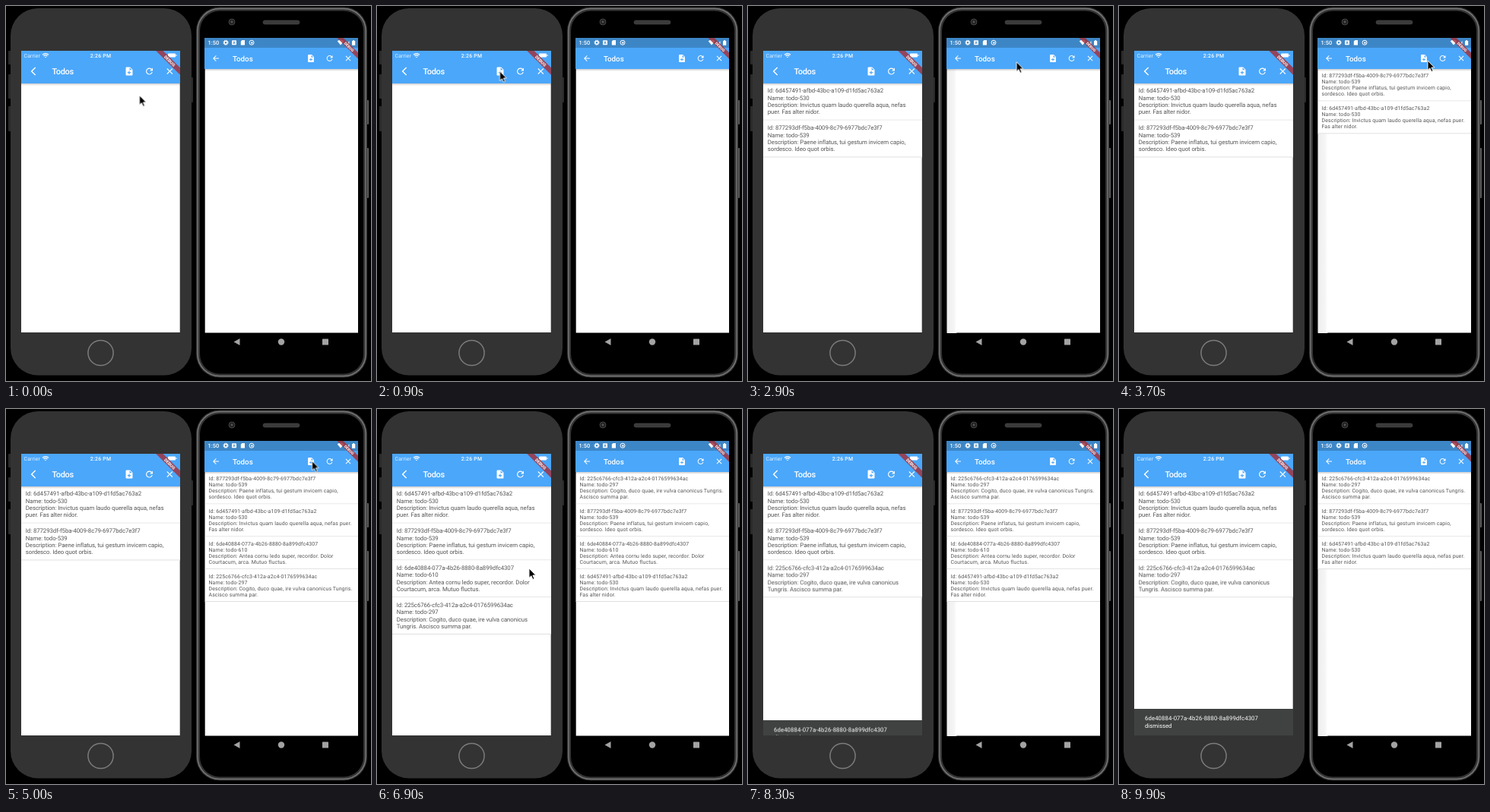
These frames come from a looping animation (480 px wide and 494 px high, 10000 ms). An HTML page:

```html
<!DOCTYPE html>
<html lang="en">
<head>
<meta charset="utf-8">
<title>Todos on two phones</title>
<style>
html, body { margin: 0; width: 100%; height: 100%; overflow: hidden; background: #000; }
svg { display: block; width: 480px; height: 494px; }
text { font-family: Roboto, "Liberation Sans", sans-serif; text-rendering: geometricPrecision; white-space: pre; }
.row text { fill: #555; }
.ios .row text { font-size: 7.8px; letter-spacing: -.06px; }
.droid .row text { font-size: 6.95px; letter-spacing: .11px; }
.title { fill: #fff; font-weight: 500; }
.icon { fill: #fff; }

.anim { animation: 10s linear infinite; }
.cut { animation-timing-function: step-end; opacity: 0; }

.ios1 { animation-name: ios1 }
.ios2 { animation-name: ios2 }
.ios3 { animation-name: ios3 }
.ios4 { animation-name: ios4 }
.under { animation-name: under }
.pair { animation-name: pair }
.third { animation-name: third }
.fourth { animation-name: fourth }
.sorted { animation-name: sorted }
.final { animation-name: final }
.edge { animation-name: edge }
@keyframes ios1 { 0% { opacity: 0 } 9.9%, 100% { opacity: 1 } }
@keyframes ios2 { 0% { opacity: 0 } 24.9%, 100% { opacity: 1 } }
@keyframes ios3 { 0% { opacity: 0 } 61.9% { opacity: 1 } 82%, 100% { opacity: 0 } }
@keyframes ios4 { 0% { opacity: 0 } 61.9%, 100% { opacity: 1 } }
@keyframes under { 0% { opacity: 0 } 70.5% { opacity: 1 } 82%, 100% { opacity: 0 } }
@keyframes pair { 0% { opacity: 0 } 32.9% { opacity: 1 } 54.9%, 100% { opacity: 0 } }
@keyframes third { 0% { opacity: 0 } 40.9% { opacity: 1 } 54.9%, 100% { opacity: 0 } }
@keyframes fourth { 0% { opacity: 0 } 45.9% { opacity: 1 } 54.9%, 100% { opacity: 0 } }
@keyframes sorted { 0% { opacity: 0 } 54.9% { opacity: 1 } 87.9%, 100% { opacity: 0 } }
@keyframes final { 0% { opacity: 0 } 87.9%, 100% { opacity: 1 } }
@keyframes edge { 0% { opacity: 0 } 10.9% { opacity: 1 } 43.9% { opacity: 0 } 76.9%, 100% { opacity: 1 } }

.swipe { animation-name: swipe }
.shrink { animation-name: shrink; transform-origin: 0 199.4px }
.lift { animation-name: lift }
.snack { animation-name: snack }
.cursor { animation-name: cursor; animation-timing-function: ease-in-out }
@keyframes swipe {
  0%, 70.5% { transform: translateX(0); animation-timing-function: ease-in-out }
  77% { transform: translateX(-194px) }
  78%, 100% { transform: translateX(-210px) }
}
@keyframes shrink {
  0%, 79% { transform: scaleY(1); animation-timing-function: ease }
  82%, 100% { transform: scaleY(0) }
}
@keyframes lift {
  0%, 79% { transform: translateY(0); animation-timing-function: ease }
  82%, 100% { transform: translateY(-48.8px) }
}
@keyframes snack {
  0%, 82% { transform: translateY(36px); animation-timing-function: ease-out }
  84.5%, 100% { transform: translateY(0) }
}
@keyframes cursor {
  0%, 1% { transform: translate(175.5px, 117.8px) }
  8%, 25.5% { transform: translate(161.5px, 86px) }
  31%, 33.5% { transform: translate(425px, 69px) }
  37% { transform: translate(406px, 72px) }
  39.5%, 51% { transform: translate(402.5px, 68.5px) }
  53.5%, 55.5% { transform: translate(425px, 69px) }
  60%, 62.5% { transform: translate(188px, 85px) }
  68%, 70% { transform: translate(200px, 210px) }
  77% { transform: translate(-4px, 222px) }
  78%, 100% { transform: translate(-20px, 222px) }
}
</style>
</head>
<body>
<svg viewBox="0 0 480 494">
  <defs>
    <clipPath id="iosScreen"><rect x="20" y="59" width="208.7" height="371"/></clipPath>
    <clipPath id="droidScreen"><rect x="261.7" y="42" width="201.3" height="388.5"/></clipPath>
    <linearGradient id="shade" x2="0" y2="1"><stop stop-color="#000" stop-opacity=".2"/><stop offset="1" stop-color="#000" stop-opacity="0"/></linearGradient>
    <linearGradient id="side"><stop stop-color="#efefef"/><stop offset=".75" stop-color="#f5f5f5"/><stop offset="1" stop-color="#fff"/></linearGradient>
    <path id="back" d="M20 11H7.83l5.59-5.59L12 4l-8 8 8 8 1.41-1.41L7.83 13H20z"/>
    <path id="chevron" d="M17.67 3.87 15.9 2.1 6 12l9.9 9.9 1.77-1.77L9.54 12z"/>
    <path id="add" d="M14 2H6c-1.1 0-2 .9-2 2v16c0 1.1.9 2 2 2h12c1.1 0 2-.9 2-2V8zm2 14h-3v3h-2v-3H8v-2h3v-3h2v3h3zm-3-7V3.5L18.5 9z"/>
    <path id="refresh" d="M17.65 6.35A8 8 0 1 0 19.73 14h-2.08A6 6 0 1 1 16.22 7.78L13 11h7V4z"/>
    <path id="close" d="M19 6.41 17.59 5 12 10.59 6.41 5 5 6.41 10.59 12 5 17.59 6.41 19 12 13.41 17.59 19 19 17.59 13.41 12z"/>
    <g id="banner">
      <rect x="-44" y="28" width="88" height="12" fill="#a4303a" fill-opacity=".82"/>
      <text y="37.7" font-size="10.2" font-weight="900" fill="#fff" fill-opacity=".9" text-anchor="middle">DEBUG</text>
    </g>
  </defs>

  <!-- Left phone -->
  <g fill="#2b2b2b">
    <rect x="3" y="59" width="5" height="18" rx="1"/>
    <rect x="3" y="90" width="5" height="32" rx="1"/>
    <rect x="3" y="132" width="5" height="33" rx="1"/>
    <rect x="242" y="94" width="4" height="33" rx="1"/>
  </g>
  <rect x="6" y="3" width="238" height="483.5" rx="36" fill="#333"/>
  <circle cx="124.5" cy="457" r="16.6" fill="none" stroke="#7b7b7b" stroke-width="1.5"/>
  <g class="ios" clip-path="url(#iosScreen)">
    <rect x="20" y="59" width="209" height="371" fill="#fff"/>
    <g id="iosList"></g>
    <rect x="20" y="102" width="209" height="3" fill="url(#shade)"/>
    <rect x="20" y="59" width="209" height="43" fill="#4ba7fa"/>
    <g fill="#fff" font-size="6.9">
      <text x="23.6" y="67.6" fill-opacity=".85" letter-spacing=".1">Carrier</text>
      <text x="124.5" y="67.6" font-weight="500" text-anchor="middle" letter-spacing=".25">2:26 PM</text>
      <rect x="213" y="62.5" width="10" height="5" rx="1"/>
      <rect x="223.5" y="64" width="1" height="2"/>
    </g>
    <g fill="none" stroke="#fff" stroke-width="1.2">
      <path d="M48 64.3Q52 60.8 56 64.3M49.6 66Q52 63.8 54.4 66M51.2 67.5h1.6"/>
    </g>
    <text class="title" x="60.5" y="90" font-size="11" letter-spacing="-.35">Todos</text>
    <g class="icon" id="iosIcons"></g>
    <use href="#banner" transform="translate(228.7 59) rotate(45) scale(.557)"/>
    <g class="anim snack">
      <rect x="20" y="395" width="209" height="36" fill="#404242"/>
      <g fill="#fff" font-size="7.75">
        <text x="34" y="410.3" letter-spacing=".1">6de40884-077a-4b26-8880-8a899dfc4307</text>
        <text x="34" y="419.6">dismissed</text>
      </g>
    </g>
  </g>

  <!-- Right phone -->
  <g fill="#5a5a5a">
    <rect x="473" y="124" width="4" height="32" rx="1"/>
    <rect x="473" y="187" width="4" height="66" rx="1"/>
  </g>
  <rect x="250" y="1.5" width="225" height="488" rx="31" fill="#353535"/>
  <rect x="252" y="3.5" width="221" height="484" rx="29" fill="none" stroke="#7a7a7a" stroke-width="1.4"/>
  <rect x="255" y="6.5" width="215" height="478" rx="26" fill="#000"/>
  <circle cx="297" cy="21" r="4" fill="#222" stroke="#444"/>
  <circle cx="297" cy="21" r="1.4" fill="#555"/>
  <rect x="338" y="19" width="48" height="5" rx="2.5" fill="#3a3a3a" stroke="#4c4c4c" stroke-width=".6"/>
  <g fill="#a3a3a3">
    <path d="M299.5 442.5 307.5 438v9z"/>
    <circle cx="362" cy="442.5" r="4.2"/>
    <rect x="416" y="438.5" width="8" height="8" rx=".6"/>
  </g>
  <g class="droid" clip-path="url(#droidScreen)">
    <rect x="261" y="42" width="203" height="389" fill="#fff"/>
    <rect class="anim cut edge" x="261.7" y="83" width="12.5" height="348" fill="url(#side)"/>
    <g id="droidList"></g>
    <rect x="261" y="83" width="203" height="3" fill="url(#shade)"/>
    <rect x="261" y="42" width="203" height="41" fill="#4ba7fa"/>
    <rect x="261" y="42" width="203" height="13" fill="#3d86c6"/>
    <g fill="#fff">
      <text x="265.6" y="51" font-size="7.4" font-weight="500">1:50</text>
      <circle cx="289" cy="48.2" r="2" fill="none" stroke="#fff" stroke-width="1.5"/>
      <circle cx="289" cy="48.2" r="3.1" fill="none" stroke="#fff" stroke-width="1" stroke-dasharray="1.4 1.03"/>
      <rect x="297" y="45.2" width="6" height="6" rx=".8"/>
      <path d="M308.8 46.8 310.3 45H314v6.6h-5.2z"/>
      <circle cx="323" cy="48.2" r="3" fill="none" stroke="#fff"/>
      <circle cx="323.4" cy="48.4" r="1.2"/>
      <path d="M435.7 46.2Q440 43 444.3 46.2L440 51.5z"/>
      <path d="M446.3 51.3h5.2v-5.4z" fill-opacity=".75"/>
      <path d="M455 46h1.2v-1h1.8v1h1.2v5.8H455z"/>
    </g>
    <text x="300" y="50.2" font-size="5" font-weight="700" text-anchor="middle" fill="#3d86c6">A</text>
    <text class="title" x="298" y="72.5" font-size="9.8">Todos</text>
    <g class="icon" id="droidIcons"></g>
    <use href="#banner" transform="translate(463 42) rotate(45) scale(.489)"/>
  </g>

  <g class="anim cursor">
    <path d="M0 0V12.4L2.9 9.8 4.9 14.4 6.9 13.5 4.9 9H8.8z" fill="#000" stroke="#fff" stroke-width=".9"/>
  </g>
</svg>
<script>
const todos = {
  530: {
    id: '6d457491-afbd-43bc-a109-d1fd5ac763a2',
    ios: ['Invictus quam laudo querella aqua, nefas', 'puer. Fas alter nidor.'],
    droid: ['Invictus quam laudo querella aqua, nefas puer.', 'Fas alter nidor.']
  },
  539: {
    id: '877293df-f5ba-4009-8c79-6977bdc7e3f7',
    ios: ['Paene inflatus, tui gestum invicem capio,', 'sordesco. Ideo quot orbis.']
  },
  610: {
    id: '6de40884-077a-4b26-8880-8a899dfc4307',
    ios: ['Antea cornu ledo super, recordor. Dolor', 'Courtacum, arca. Mutuo fluctus.']
  },
  297: {
    id: '225c6766-cfc3-412a-a2c4-0176599634ac',
    ios: ['Cogito, duco quae, ire vulva canonicus', 'Tungris. Ascisco summa par.'],
    droid: ['Cogito, duco quae, ire vulva canonicus Tungris.', 'Ascisco summa par.']
  }
};
const phones = {
  ios: { x: 20, y: 101.8, w: 209, pitch: 48.8, pad: 5.8, base: 12.6, line: 9.35, icon: 13.4 },
  droid: { x: 261.7, y: 82.6, w: 201.5, pitch: 42.85, pad: 4.8, base: 11.7, line: 8.03, icon: 11.75 }
};

function row(kind, num, slot) {
  const p = phones[kind], todo = todos[num], top = p.y + slot * p.pitch;
  const [first, second] = todo[kind] || todo.ios;
  const lines = ['Id: ' + todo.id, 'Name: todo-' + num, 'Description: ' + first, second];
  const texts = lines.map((s, i) =>
    `<text x="${p.x + p.pad}" y="${top + p.base + i * p.line}">${s}</text>`).join('');
  return `<g class="row"><rect x="${p.x}" y="${top}" width="${p.w}" height="${p.pitch}" fill="#fff"/>
    <rect x="${p.x}" y="${top + p.pitch - .9}" width="${p.w}" height=".9" fill="#dcdcdc"/>${texts}</g>`;
}
const rows = (kind, nums, slot = 0) => nums.map((n, i) => row(kind, n, slot + i)).join('');
const cut = (name, body) => `<g class="anim cut ${name}">${body}</g>`;
const move = (name, body) => `<g class="anim ${name}">${body}</g>`;
const fill = (id, html) => { document.getElementById(id).innerHTML = html; };

function icons(kind, y, places) {
  const size = phones[kind].icon, k = size / 24;
  return Object.entries(places).map(([name, x]) =>
    `<use href="#${name}" transform="translate(${x - size / 2} ${y - size / 2}) scale(${k})"/>`).join('');
}

const red = '<rect x="20" y="199.4" width="209" height="48.8" fill="#f4694c"/>';
fill('iosList',
  cut('ios1', row('ios', 530, 0)) +
  cut('ios2', row('ios', 539, 1)) +
  cut('ios3', cut('under', move('shrink', red)) + move('swipe', row('ios', 610, 2))) +
  cut('ios4', move('lift', row('ios', 297, 3))));
fill('droidList',
  cut('pair', rows('droid', [539, 530])) +
  cut('third', row('droid', 610, 2)) +
  cut('fourth', row('droid', 297, 3)) +
  cut('sorted', rows('droid', [297, 539, 610, 530])) +
  cut('final', rows('droid', [297, 539, 530])));
fill('iosIcons', icons('ios', 86, { chevron: 36, add: 162, refresh: 188.5, close: 215.3 }));
fill('droidIcons', icons('droid', 69, { back: 276, add: 401, refresh: 425.6, close: 450 }));
</script>
</body>
</html>
```
